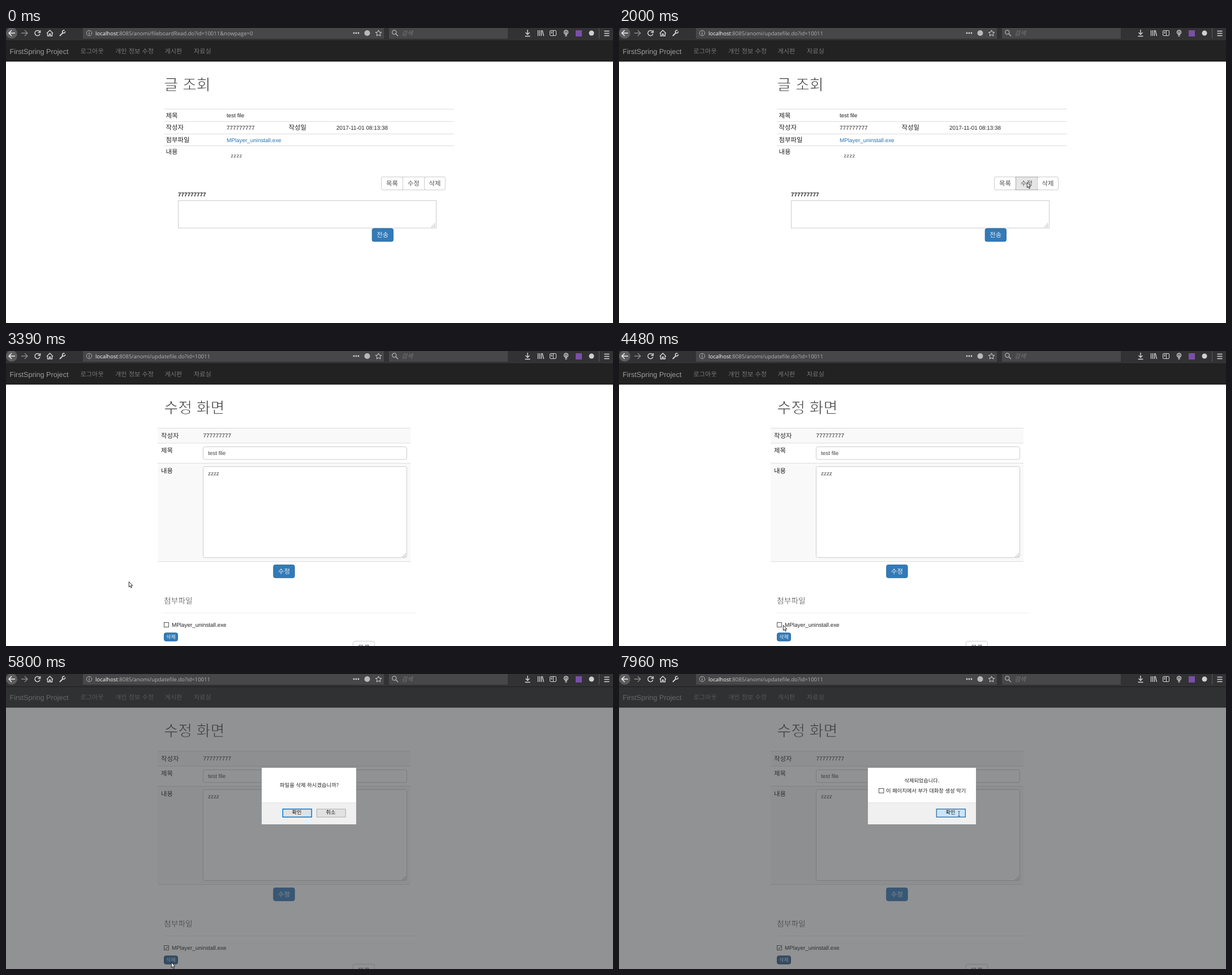
Animation, 1073 px wide and 522 px high, one loop 8 s. Source, as an HTML page:

```html
<!DOCTYPE html>
<html lang="ko">
<head>
<meta charset="utf-8">
<title>FirstSpring Project</title>
<style>
  html, body { margin: 0; width: 100%; height: 100%; overflow: hidden; background: #fff; }
  svg { display: block; width: 100vw; height: 100vh; }
  text { white-space: pre; text-rendering: geometricPrecision; }
  .ui { font-family: "Liberation Sans", Arial, "Noto Sans CJK KR", sans-serif; }
  .ko { font-family: "Noto Sans CJK KR", "Noto Sans CJK", "Noto Sans CJK JP", sans-serif; }
  .url { font-family: "Open Sans", "Noto Sans", sans-serif; }
  .mono { font-family: "DejaVu Sans Mono", monospace; }
</style>
</head>
<body>
<svg id="stage" viewBox="0 0 1073 522" preserveAspectRatio="none"></svg>
<script>
const LOOP = 8000, FIRST = 140, STEP = 77.4;
const USER = '777777777', FILE = 'MPlayer_uninstall.exe';
const stage = document.getElementById('stage');

function add(parent, tag, attrs, content) {
  const el = document.createElementNS('http://www.w3.org/2000/svg', tag);
  for (const k in attrs) el.setAttribute(k, attrs[k]);
  if (content !== undefined) el.textContent = content;
  return parent.appendChild(el);
}
const group = (parent = stage) => add(parent, 'g', {});
const rect = (g, x, y, width, height, fill, more) => add(g, 'rect', { x, y, width, height, fill, ...more });
const box = (g, x, y, w, h, fill, stroke, rx = 0) => rect(g, x + .5, y + .5, w - 1, h - 1, fill, { stroke, rx });
const path = (g, d, stroke, more) => add(g, 'path', { d, fill: 'none', stroke, ...more });
const hline = (g, x1, x2, y, color = '#ddd') => rect(g, x1, y, x2 - x1, 1, color);
const text = (g, x, y, str, size, fill, cls = 'ui', more) =>
  add(g, 'text', { x, y, fill, class: cls, 'font-size': size, ...more }, str);
const ko = (g, x, y, str, size, fill, more) => text(g, x, y, str, size, fill, 'ko', more);
const mid = { 'text-anchor': 'middle' };
const light = { 'font-weight': 300 };
// A stroke in the background colour slims the glyphs
const thin = (bg, width) => ({ ...light, stroke: bg, 'stroke-width': width });

function button(g, x, y, w, h, label, size, fill, stroke, color, rx = 3) {
  const shape = box(g, x, y, w, h, fill, stroke, rx);
  ko(g, x + w / 2, y + h / 2 + size * .36, label, size, color, { ...mid, ...light });
  return shape;
}
const primary = (g, x, y, w, h, label, size) => button(g, x, y, w, h, label, size, '#337ab7', '#2e6da4', '#e6eef6');

function grip(g, x, y) {
  for (let i = 0; i < 3; i++)
    for (let j = 0; j <= i; j++) rect(g, x - j * 2.5, y - 5 + i * 2.5, 1.3, 1.3, '#999');
}

// Browser toolbar
function drawToolbar() {
  const g = group(), c = '#d7d7db';
  rect(g, 0, 0, 1073, 23, '#323234');
  rect(g, 136, 0, 532, 19, '#474749');
  rect(g, 677, 0, 210, 19, '#474749');
  rect(g, 0, 22, 1073, 1, '#1c1c1d');
  add(g, 'circle', { cx: 10, cy: 9, r: 10, fill: '#5c5c5e' });
  path(g, 'M16 9H5M10 4L5 9L10 14', '#eee', { 'stroke-width': 1.5 });
  path(g, 'M27 9H38M33 4L38 9L33 14', '#8a8a8c', { 'stroke-width': 1.4 });
  const reload = path(g, 'M59.5 6.5A4.6 4.6 0 1 0 60 10.5M60.5 4V8H56.5', c, { 'stroke-width': 1.5 });
  const stop = path(g, 'M51 5L60 14M60 5L51 14', c, { 'stroke-width': 1.5 });
  path(g, 'M72 9.5L77.5 4L83 9.5M73.5 9V14H76.5V10.5H78.5V14H81.5V9', c, { 'stroke-width': 1.4 });
  path(g, 'M95 14L101 8', c, { 'stroke-width': 2 });
  path(g, 'M103.5 4.5A2.5 2.5 0 1 0 104.5 6', c, { 'stroke-width': 1.6 });
  add(g, 'circle', { cx: 147, cy: 9, r: 4.7, fill: 'none', stroke: '#b1b1b3' });
  path(g, 'M147 6V7.2M147 8.3V12', '#b1b1b3', { 'stroke-width': 1.2 });
  const url = text(g, 158, 13, '', 9.5, '#b1b1b3', 'url');
  add(url, 'tspan', { fill: '#f9f9fa' }, 'localhost');
  const route = add(url, 'tspan', {}, '');
  for (const x of [615, 619, 623]) add(g, 'circle', { cx: x, cy: 9, r: 1.4, fill: c });
  add(g, 'circle', { cx: 638.5, cy: 9, r: 5, fill: '#b9b9bc' });
  path(g, 'M658.5 3.8L660.1 7.3L663.8 7.7L661 10.2L661.8 14L658.5 12L655.2 14L656 10.2L653.2 7.7L656.9 7.3Z', c);
  add(g, 'circle', { cx: 686.3, cy: 7.5, r: 3.6, fill: 'none', stroke: '#b1b1b3', 'stroke-width': 1.3 });
  path(g, 'M689 10.3L693 14.3', '#b1b1b3', { 'stroke-width': 1.6 });
  ko(g, 699, 13, '검색', 10.8, '#77777a', { 'font-style': 'italic', ...light });

  path(g, 'M922 3V11M918.5 8L922 11.5L925.5 8M917.5 14.5H926.5', c, { 'stroke-width': 1.4 });
  path(g, 'M940.5 4V14M943.5 4V14M946.5 4V14M948 4L950.5 14', c, { 'stroke-width': 1.3 });
  box(g, 961, 4, 12, 10, 'none', c, 1.5);
  path(g, 'M967.5 4V14M963 7H966M963 9H966', c);
  add(g, 'circle', { cx: 990, cy: 7.5, r: 3.8, fill: '#777', stroke: c });
  path(g, 'M988 12.5H992M988.5 14.5H991.5M990 7V11', c);
  rect(g, 1007, 4, 11, 11, '#7b4fa8');
  add(g, 'circle', { cx: 1035, cy: 9, r: 4.5, fill: '#d0d0d3' });
  rect(g, 1048, 0, 1, 19, '#5a5a5c');
  path(g, 'M1057.5 5.5H1066.5M1057.5 9.5H1066.5M1057.5 13.5H1066.5', c, { 'stroke-width': 1.4 });
  return { reload, stop, route };
}

function drawNav() {
  const g = group();
  rect(g, 0, 23, 1073, 499, '#fff');
  rect(g, 0, 23, 1073, 36, '#222');
  rect(g, 0, 58.4, 1073, 1, '#080808');
  text(g, 6.5, 45.5, 'FirstSpring Project', 12.65, '#9d9d9d');
  [[131.5, '로그아웃'], [193, '개인 정보 수정'], [280.5, '게시판'], [332, '자료실']]
    .forEach(([x, s]) => ko(g, x, 45, s, 11.2, '#9d9d9d', thin('#222', .25)));
}

function drawView() {
  const g = group();
  ko(g, 279.5, 110, '글 조회', 27, '#333', thin('#fff', .8));
  for (const y of [143, 165, 187, 208]) hline(g, 279, 792, y);
  ['제목', '작성자', '첨부파일', '내용'].forEach((s, i) => ko(g, 282.5, 158.5 + i * 21.6, s, 11.4, '#222'));
  ko(g, 499.5, 180, '작성일', 11.4, '#222');
  text(g, 390, 158, 'test file', 9.9, '#222');
  text(g, 390, 179.5, USER, 9.9, '#222');
  text(g, 584, 179.5, '2017-11-01 08:13:38', 9.9, '#222');
  text(g, 390, 201.5, FILE, 9.9, '#2a72b0');
  text(g, 397, 228.5, 'zzzz', 8.5, '#333', 'mono');

  box(g, 663, 263, 114, 24, '#fff', '#ccc', 3);
  const tabs = ['목록', '수정', '삭제'].map((s, i) =>
    button(g, 663 + i * 38, 263, i == 2 ? 38 : 39, 24, s, 11.4, '#fff', '#ccc', '#555', i == 1 ? 0 : 3));
  text(g, 304, 297.5, USER, 9.9, '#222', 'ui', { 'font-weight': 700 });
  box(g, 304, 305, 457, 49.5, '#fff', '#ccc');
  grip(g, 757, 351);
  primary(g, 646.7, 354.3, 38.3, 23.9, '전송', 11.4);
  return { g, tabs };
}

function drawEdit() {
  const g = group();
  ko(g, 279.5, 110, '수정 화면', 27, '#333', thin('#fff', .8));
  rect(g, 268, 137, 447, 26, '#f9f9f9');
  rect(g, 268, 198, 447, 174, '#f9f9f9');
  for (const y of [136, 162.5, 198, 372]) hline(g, 268, 715, y);
  [[153.5, '작성자'], [179.5, '제목'], [215.5, '내용']].forEach(([y, s]) => ko(g, 274, y, s, 11.4, '#222'));
  text(g, 348.5, 153, USER, 9.9, '#222');
  box(g, 348, 169, 361, 23.5, '#fff', '#ccc', 3);
  text(g, 357, 184, 'test file', 9.9, '#444');
  box(g, 348, 204, 361, 162, '#fff', '#ccc', 3);
  text(g, 357, 219.5, 'zzzz', 9.9, '#444');
  grip(g, 705.5, 363);
  primary(g, 472.3, 377.9, 38.3, 23.9, '수정', 11.4);
  ko(g, 279, 446.5, '첨부파일', 13.8, '#333', thin('#fff', .4));
  hline(g, 279, 725, 463, '#eee');
  box(g, 279, 480, 9, 9, '#fff', '#555');
  const check = path(g, 'M281 484.7L282.9 486.7L286.3 482.3', '#333');
  text(g, 293, 487.7, FILE, 9.9, '#222');
  const remove = primary(g, 279, 498.3, 25, 15.4, '삭제', 9);
  button(g, 613, 513, 39, 24, '목록', 11.4, '#fff', '#ccc', '#555');
  return { g, check, remove };
}

function dialog(x, w) {
  const g = group();
  rect(g, x, 166, w, 100, '#fff');
  rect(g, x, 228, w, 38, '#f0f0f0');
  hline(g, x, x + w, 227.5, '#dfdfdf');
  return g;
}
function dialogButton(g, x, label) {
  const shape = rect(g, x + 1.3, 239, 51, 14.2, '#e1e1e1', { stroke: '#adadad' });
  ko(g, x + 26, 248.3, label, 9.2, '#111', mid);
  return shape;
}

const bar = drawToolbar();
drawNav();
const view = drawView();
const edit = drawEdit();
const shade = rect(stage, 0, 23, 1073, 499, '#3c3e40', { opacity: .56 });

const ask = dialog(452, 167);
ko(ask, 484, 200, '파일을 삭제 하시겠습니까?', 9.35, '#222');
const askOk = dialogButton(ask, 488, '확인');
dialogButton(ask, 548, '취소');

const done = dialog(440, 191);
ko(done, 504.5, 192, '삭제되었습니다.', 9.2, '#222');
box(done, 459, 202, 9.5, 9, '#fff', '#555');
ko(done, 472, 209.5, '이 페이지에서 부가 대화창 생성 막기', 9.3, '#222');
const doneOk = dialogButton(done, 560, '확인');

const cursor = group();
const arrow = path(cursor, 'M.3 .3V9.5L2.4 7.6L3.9 11L5.5 10.3L4 7H6.8Z', '#111', { fill: '#fff', 'stroke-width': .9 });
const beam = path(cursor, 'M-2 -4H-.5L0 -3.5L.5 -4H2M0 -3.5V4M-2 4.5H-.5L0 4L.5 4.5H2', '#222', { 'stroke-width': .7 });

// Pointer path: time, x, y
const track = [
  [140, 322, 42], [380, 930, 120], [590, 1033, 330], [710, 900, 484], [905, 652, 281],
  [1220, 717, 276], [1400, 717, 276], [1450, 721, 273], [2070, 721, 273],
  [2535, 360, 191], [2610, 391, 171], [2765, 398, 158], [3385, 217, 408],
  [3540, 220, 412], [3630, 220, 412], [4240, 358, 509], [4470, 290, 485],
  [4545, 284, 481], [5010, 284, 481], [5325, 292, 510], [6030, 292, 510],
  [6405, 538, 253], [6640, 532, 250], [6790, 528, 248], [7110, 528, 248],
  [7565, 614, 256], [7950, 601, 247]
];
function pointerAt(t) {
  const i = track.findIndex(k => k[0] > t);
  if (i < 0) return track[track.length - 1].slice(1);
  if (i == 0) return track[0].slice(1);
  const [t0, x0, y0] = track[i - 1], [t1, x1, y1] = track[i], p = (t - t0) / (t1 - t0);
  return [Math.round(x0 + (x1 - x0) * p), Math.round(y0 + (y1 - y0) * p)];
}

const show = (el, on) => el.setAttribute('display', on ? 'inline' : 'none');
function paint(el, fill, stroke, width = 1) {
  el.setAttribute('fill', fill);
  el.setAttribute('stroke', stroke);
  el.setAttribute('stroke-width', width);
}

function render(t) {
  const s = FIRST + Math.floor((t - FIRST + 8) / STEP) * STEP;
  const [x, y] = pointerAt(s);
  const over = (l, top, r, b) => t >= FIRST && x >= l && x < r && y >= top && y < b;
  const editing = t >= 2090, asking = t >= 5800 && t < 6970, finished = t >= 6970;
  const modal = asking || finished, loading = t >= 1610 && t < 1770;

  show(bar.reload, !loading);
  show(bar.stop, loading);
  bar.route.textContent = ':8085/anomi/' +
    (t < 1770 ? 'fileboardRead.do?id=10011&nowpage=0' : 'updatefile.do?id=10011');

  show(view.g, !editing);
  show(edit.g, editing);
  view.tabs.forEach((tab, i) => {
    const hot = over(663 + i * 38, 263, 701 + i * 38, 287);
    paint(tab, hot ? '#e6e6e6' : '#fff', hot ? '#adadad' : '#ccc');
  });
  show(edit.check, t >= 4855);
  const hot = t >= 5560 || over(279, 498, 304, 514);
  paint(edit.remove, hot ? '#286090' : '#337ab7', hot ? '#204d74' : '#2e6da4');

  show(shade, modal);
  show(ask, asking);
  show(done, finished);
  [[askOk, 488], [doneOk, 560]].forEach(([ok, left]) => {
    const lit = over(left, 238, left + 53, 254);
    paint(ok, lit ? '#cce4f7' : '#e1e1e1', lit ? '#3f7cab' : '#0078d7', 1.5);
  });

  const inField = editing
    ? over(348, 169, 709, 192) || over(348, 204, 709, 366)
    : over(304, 305, 761, 354);
  const textual = modal ? t >= 7715 : inField;
  show(cursor, t >= FIRST);
  show(arrow, !textual);
  show(beam, textual);
  cursor.setAttribute('transform', `translate(${x} ${y})`);
}

function tick() {
  render(performance.now() % LOOP);
  requestAnimationFrame(tick);
}
tick();
</script>
</body>
</html>
```
